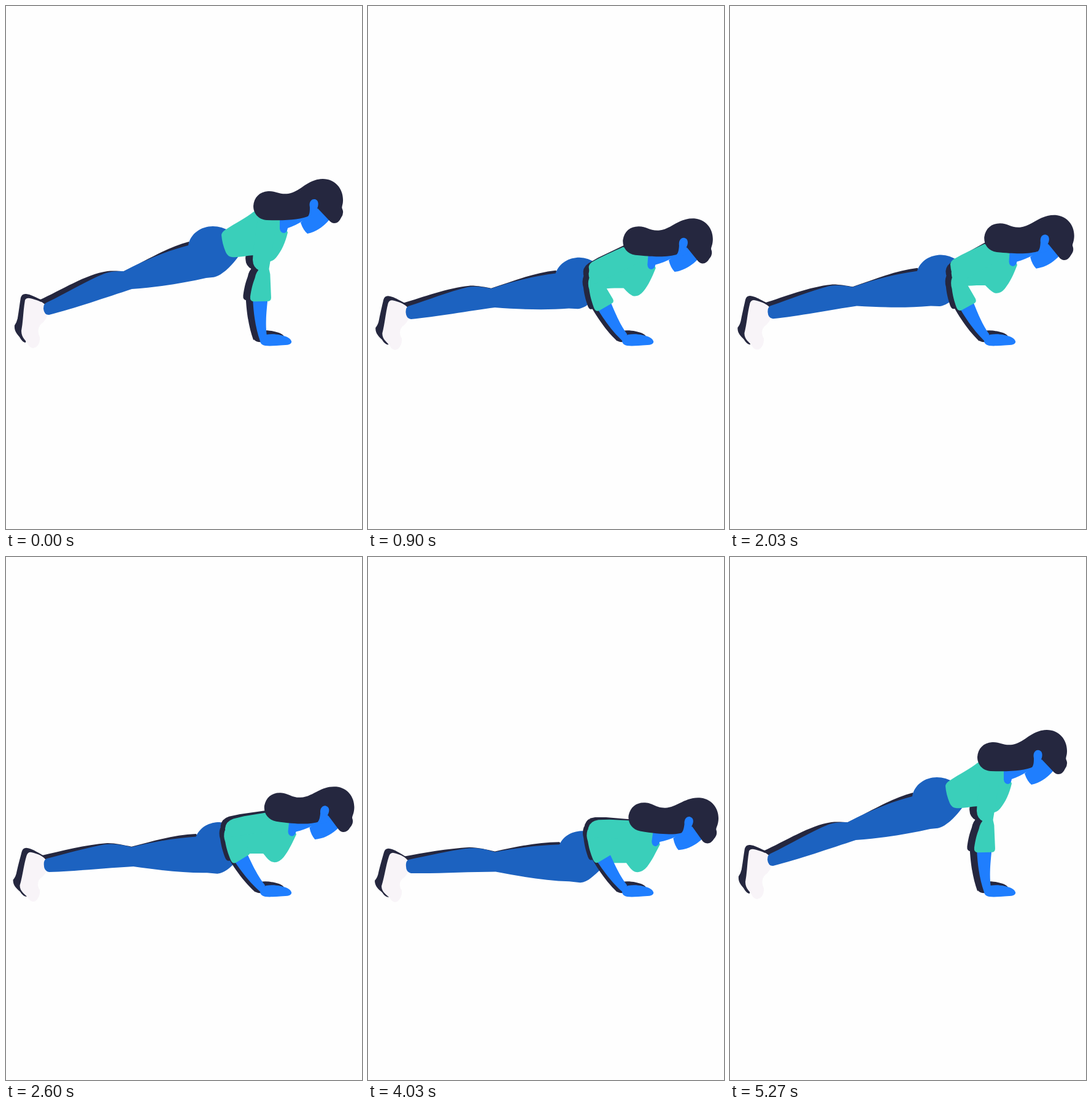
These frames come from a looping animation (580x850 px, 5310 ms). An HTML page:

```html
<!DOCTYPE html>
<html lang="en">
<head>
<meta charset="utf-8">
<title>Push-ups</title>
<style>
  html, body { margin: 0; width: 100%; height: 100%; overflow: hidden; background: #fefefe; }
  svg { display: block; width: 580px; height: 850px; }
  .navy { fill: #25273f; }
  .pants { fill: #1c62c0; }
  .skin { fill: #1f7efe; }
  .shirt { fill: #3acfba; }
  .shoe { fill: #f8f4f8; }
  #farArm * { fill: #25273f; }
</style>
</head>
<body>
<svg viewBox="0 0 580 850">
  <defs>
    <path id="upper" d="M-17 0L-18 50L-17 68Q-15 81 -4 84Q4 86 11 81L12 60L14 0Z"/>
    <path id="cuff" d="M-3 -2Q-10 4 -12 14C-16 24 -18 32 -20 44Q-21 52 -14 52L10 52Q14 51 14 46L13 8Q12 2 10 -4Z"/>
    <path id="forearm" d="M-16 44C-15 75 -12 95 -5 117L6 108C4 92 5 75 9 44Z"/>
    <path id="hand" d="M424 534C438 532 450 535 458 538Q466 542 465 547Q463 551 455 551C440 552 430 553 422 552Q413 550 414 542Q417 536 424 534Z"/>
  </defs>
  <path id="farShoe" class="navy"/>
  <path id="farLeg" class="navy"/>
  <path id="shoe" class="shoe"/>
  <path id="pants" class="pants"/>
  <g id="farArm">
    <use href="#hand" x="-11" y="-6"/>
    <g class="lower"><use href="#forearm"/><use href="#cuff"/></g>
    <use href="#upper" class="top"/>
  </g>
  <path id="torso" class="shirt"/>
  <g id="nearArm">
    <use href="#hand" class="skin"/>
    <g class="lower"><use href="#forearm" class="skin"/><use href="#cuff" class="shirt"/></g>
    <use href="#upper" class="top shirt"/>
  </g>
  <g id="head">
    <path class="skin" d="M446 345V362Q447 369 453 369Q458 368 459 361C468 358 476 354 484 349L495 342L490 335Z"/>
    <path class="skin" d="M495 338L480 352Q484 364 491 370C506 367 518 358 527 347L508 327Z"/>
    <path class="navy" d="M427 301C440 300 445 307 460 305C480 302 490 282 516 281C537 281 550 298 549 317C549 323 546 327 548 330Q551 337 546 344Q542 353 535 353Q530 353 526 348L508 329L494 341C480 347 460 349 425 348C411 347 403 337 403 325C404 311 413 302 427 301Z"/>
    <path class="skin" d="M495 327C493 318 498 313 503 314C509 315 510 322 507 329L514 336L500 344L492 342C495 338 495 333 495 327Z"/>
  </g>
</svg>
<script>
const LOOP = 1770; // one push-up, three per 5310 ms
const $ = id => document.getElementById(id);
const mix = (a, b, t) => a + (b - a) * t;

// Depth of the push-up: 0 = arms straight, 1 = lowered.
const KEYS = [[0, 0], [100, .09], [200, .335], [290, .62], [370, .85], [430, .95], [520, 1], [640, 1.01],
  [830, .83], [860, .755], [960, .33], [1100, .117], [1230, .018], [1400, 0], [LOOP, 0]];

// Each shape as [raised, lowered] outline with matching commands.
const SHAPES = {
  farShoe: [
    "M24 474Q26 467 33 468C40 469 46 472 54 476L60 478L40 500L32 547Q27 547 22 538C18 533 13 528 14 519Q18 513 19 507C21 495 22 486 24 474Z",
    "M26 480Q28 473 35 474C42 475 48 479 55 483L63 488L40 510L34 553Q28 553 23 545C17 540 11 535 11 526Q16 520 17 513C20 500 23 491 26 480Z"],
  shoe: [
    "M31 478Q33 474 39 475C48 477 57 480 62 484Q60 497 67 503Q65 511 57 517C52 522 51 530 55 538Q56 550 48 555Q40 558 36 550C33 543 25 540 25 528C28 512 28 495 31 478Z",
    "M34 487Q36 480 42 481C51 483 58 486 63 491Q60 503 66 511Q62 519 56 523C51 528 50 535 55 542Q56 553 48 560Q41 563 36 555C31 549 22 545 22 535C27 519 29 502 34 487Z"],
  farLeg: [
    "M54 478C90 462 130 436 165 431C175 430 185 431 192 431C225 416 262 392 298 383L305 392L192 440L70 490Z",
    "M57 487C90 481 130 474 165 472C178 472 195 476 207 479C240 472 275 464 312 464L320 474L207 490L72 498Z"],
  pants: [
    "M61 492Q61 484 66 482C100 466 130 447 160 435C170 431 182 431 192 431C225 413 262 398 297 389C300 370 318 358 337 358Q352 358 364 366L378 408C366 424 350 440 336 441L326 442C290 450 250 457 205 460C165 473 110 492 70 502Q62 502 61 492Z",
    "M62 503Q61 494 66 492C100 485 130 478 160 474C175 472 192 475 207 480C240 474 275 469 312 468C320 452 335 446 350 446Q365 447 376 456L381 507C370 516 360 529 346 530L328 528C290 527 250 520 208 512C165 512 110 515 70 514Q62 512 62 503Z"],
  torso: [
    "M351 372Q352 367 357 364C375 352 390 345 404 334L446 340L459 368C455 385 449 398 440 409Q434 416 427 415C420 412 415 408 410 405L404 405C390 406 378 409 368 408Q361 407 358 400Q352 386 351 372Z",
    "M366 462Q367 457 371 454C388 446 403 440 424 434L467 450L476 468C468 483 463 494 455 504Q445 516 434 512C428 509 425 503 421 498L400 498C396 498 390 497 385 495Q376 496 373 490Q367 476 366 462Z"]
};

const NUM = /-?\d+(\.\d+)?/g;
const morphs = Object.entries(SHAPES).map(([id, [up, down]]) => ({ el: $(id), up, to: down.match(NUM).map(Number) }));

// Monotone cubic through the keys.
const slope = i => (KEYS[i + 1][1] - KEYS[i][1]) / (KEYS[i + 1][0] - KEYS[i][0]);
const tangents = KEYS.map((_, i) => {
  if (i === 0 || i === KEYS.length - 1) return 0;
  const a = slope(i - 1), b = slope(i);
  return a * b > 0 ? 2 * a * b / (a + b) : 0;
});

function depthAt(ms) {
  let i = 0;
  while (i < KEYS.length - 2 && ms >= KEYS[i + 1][0]) i++;
  const [t0, y0] = KEYS[i], [t1, y1] = KEYS[i + 1];
  const h = t1 - t0, u = (ms - t0) / h, v = 1 - u;
  return y0 * (1 + 2 * u) * v * v + y1 * u * u * (3 - 2 * u)
    + h * u * v * (tangents[i] * v - tangents[i + 1] * u);
}

function place(el, x, y, toX, toY) {
  const deg = Math.atan2(x - toX, toY - y) * 180 / Math.PI;
  el.setAttribute("transform", `translate(${x} ${y}) rotate(${deg})`);
}

// Two-bone arm with a planted hand; the elbow bends backwards.
const UPPER = 81.6, LOWER = 112;
function poseArm(arm, sx, sy, hx, hy) {
  const dx = sx - hx, dy = sy - hy, d = Math.hypot(dx, dy);
  const along = (LOWER ** 2 - UPPER ** 2 + d * d) / (2 * d);
  const out = Math.sqrt(Math.max(0, LOWER ** 2 - along ** 2));
  const ex = hx + (dx * along + dy * out) / d;
  const ey = hy + (dy * along - dx * out) / d;
  place(arm.querySelector(".top"), sx, sy, ex, ey);
  place(arm.querySelector(".lower"), ex, ey, hx, hy);
}

function draw(now) {
  const d = depthAt(now % LOOP);
  for (const { el, up, to } of morphs) {
    let i = 0;
    el.setAttribute("d", up.replace(NUM, n => mix(+n, to[i++], d).toFixed(2)));
  }
  const sx = mix(427, 443, d), sy = mix(347, 447, d);
  poseArm($("nearArm"), sx, sy, 419, 540);
  poseArm($("farArm"), sx - mix(12, 6, d), sy - 2, 408, 538);
  // The head tips forward as the body lowers.
  $("head").setAttribute("transform", `translate(${22 * d} ${111 * d}) rotate(${7.8 * d} 515 316)`);
}

const start = performance.now();
function tick() {
  draw(performance.now() - start);
  requestAnimationFrame(tick);
}
tick();
</script>
</body>
</html>
```
